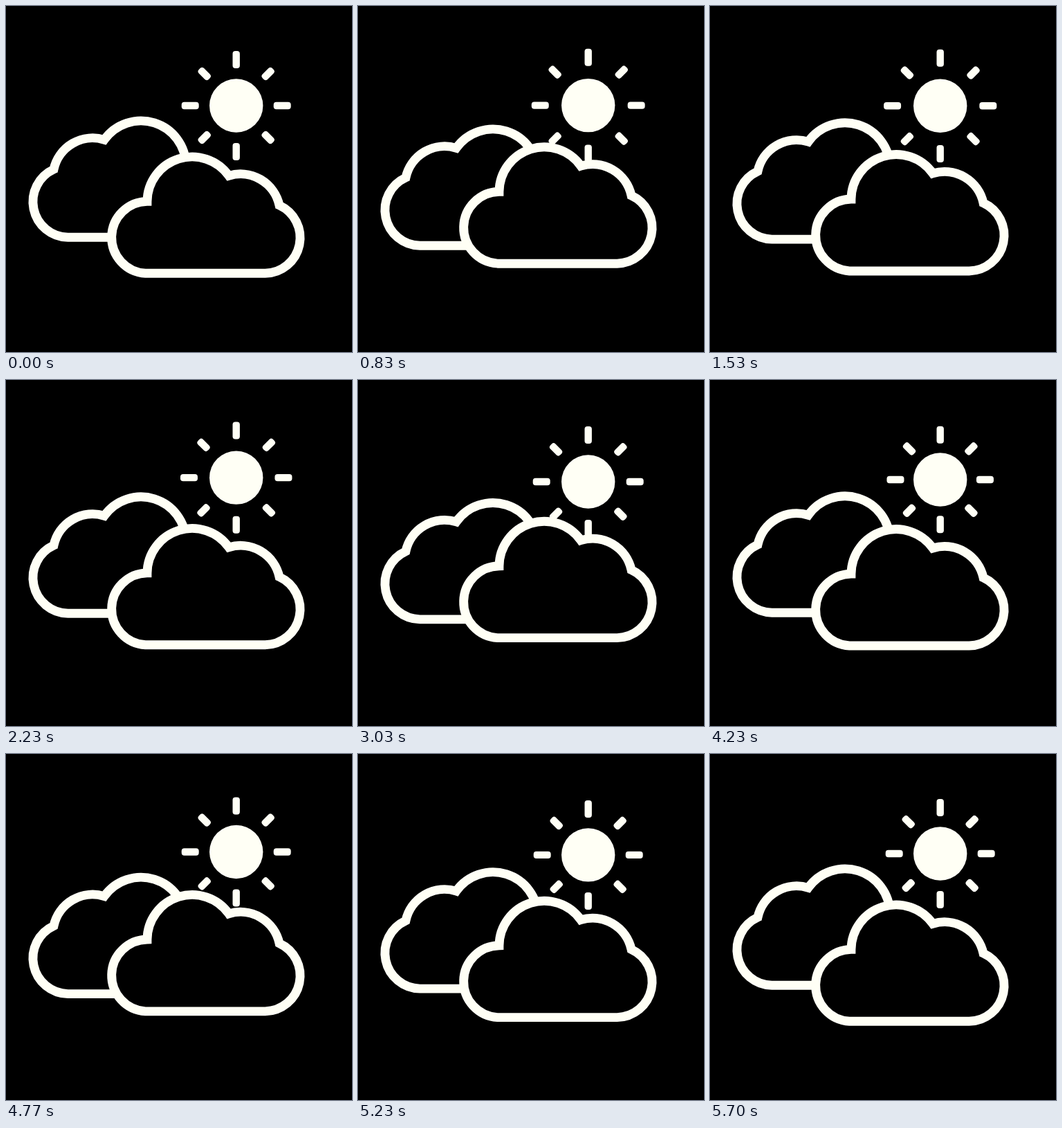
An HTML page for the animation above (5.73 s loop, 500x500 px).

```html
<!DOCTYPE html>
<html lang="en">
<head>
<meta charset="utf-8">
<title>Sun and clouds</title>
<style>
  html, body { margin: 0; width: 100%; height: 100%; overflow: hidden; background: #000; }
  svg { display: block; width: 100vw; height: 100vh; }
  .cloud { fill: #000; stroke: #fffff5; stroke-width: 12.9; }
  #sun { fill: #fffff5; }
</style>
</head>
<body>
<svg viewBox="0 0 500 500">
  <defs>
    <path id="cloud" class="cloud" d="M201.5 386.3A52 52 0 0 1 204 282.4A65 65 0 0 1 322 245.3A57.5 57.5 0 0 1 395 288A51.5 51.5 0 0 1 374.5 386.3Z"/>
  </defs>
  <g id="sun"><circle r="38.7"/></g>
  <g id="back"><use href="#cloud" transform="translate(464 -52) scale(-1 1)"/></g>
  <g id="front"><use href="#cloud"/></g>
</svg>
<script>
const LOOP = 5730;
const [sun, back, front] = ['sun', 'back', 'front'].map(id => document.getElementById(id));

// Rays grow from their outer end inwards; the diagonal ones are shorter.
const rays = Array.from({ length: 8 }, (_, i) => {
  const ray = document.createElementNS('http://www.w3.org/2000/svg', 'rect');
  const diagonal = i % 2;
  const width = diagonal ? 20 : 25;
  const attrs = { x: diagonal ? -24 : -width, y: -5.2, width, height: 10.4, rx: 4 };
  for (const name in attrs) ray.setAttribute(name, attrs[name]);
  return sun.appendChild(ray);
});

// Sways between turning points [time, value] with a cosine ease.
const sway = keys => t => {
  const next = keys.findIndex(([time]) => time > t);
  if (next < 0) return keys[keys.length - 1][1];
  const [t0, v0] = keys[next - 1], [t1, v1] = keys[next];
  return v0 + (v1 - v0) * (1 - Math.cos(Math.PI * (t - t0) / (t1 - t0))) / 2;
};

const cloudShift = sway([[0, 0], [200, 7], [870, -14.3], [1900, 1], [2830, -15], [3950, 2.5], [4740, -14.5], [5600, 0]]);
const rayReach = sway([[0, 79], [900, 82], [2900, 80.3], [3700, 75.5], [4770, 79]]);
// The sun bobs in ten equal half-waves.
const sunY = sway([144, 147, 139, 146, 141, 149, 139, 146, 140, 146, 144].map((y, i) => [i * LOOP / 10, y]));

const transform = (node, value) => node.setAttribute('transform', value);

function draw(t) {
  const shift = cloudShift(t);
  const reach = rayReach(t);
  transform(front, `translate(0 ${shift})`);
  transform(back, `translate(0 ${-0.85 * shift})`);
  transform(sun, `translate(332.7 ${sunY(t)})`);
  rays.forEach((ray, i) => transform(ray, `rotate(${i * 45}) translate(${reach})`));
}

const start = performance.now();
function tick() {
  draw((performance.now() - start) % LOOP);
  requestAnimationFrame(tick);
}
tick();
</script>
</body>
</html>
```
